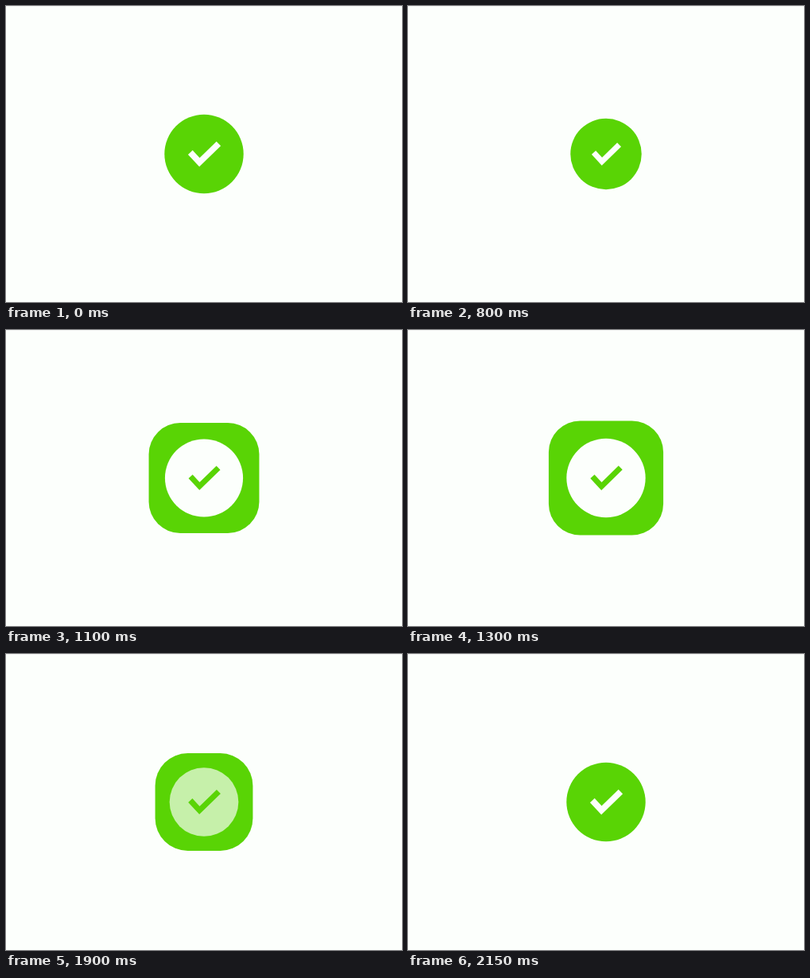
These frames come from a looping animation (498x373 px, 2.2 s). An HTML page:

```html
<!DOCTYPE html>
<html lang="en">
<head>
<meta charset="utf-8">
<title>Check toggle</title>
<style>
  html, body { margin: 0; width: 100%; height: 100%; overflow: hidden; background: #fcfffc; }
  svg { display: block; width: 498px; height: 373px; }
  .soft { filter: blur(.4px); }
</style>
</head>
<body>
<svg viewBox="0 0 498 373">
  <rect width="498" height="1" fill="#f3f5f3"/>
  <g class="soft" transform="translate(249 186.5)">
    <rect id="tile" fill="#59d405"/>
    <circle id="disc" fill="#fcfffc"/>
    <polyline id="check" points="-17.2,-2 -5.7,10.5 18.4,-13" fill="none"/>
  </g>
</svg>
<script>
// Times are in seconds.
const LOOP = 2.2, FPS = 20;
const PRESS = .45, RELEASE = .8, RESET = 1.85;
const GREEN = [89, 212, 5], WHITE = [252, 255, 252];
const [tile, disc, check] = ['tile', 'disc', 'check'].map(id => document.getElementById(id));

const clamp = x => Math.min(1, Math.max(0, x));
const ramp = (t, start, length) => clamp((t - start) / length);
const mix = (a, b, k) => a + (b - a) * k;

// Slow squeeze while pressed, then a damped bounce.
function bounce(t) {
  const s = t - RELEASE;
  if (s > 0) return 1 + .28 * Math.exp(-5 * s) * Math.sin(12.7 * (s - .029));
  const k = ramp(t, PRESS, RELEASE - PRESS);
  return 1 - .1 * (1 - Math.cos(Math.PI * k)) / 2;
}

function set(el, attrs) {
  for (const name in attrs) el.setAttribute(name, attrs[name]);
}

function draw() {
  const t = Math.floor(performance.now() / 1000 % LOOP * FPS) / FPS;
  const scale = bounce(t);
  const spread = 1 - Math.exp(-Math.max(0, t - RELEASE - .02) / .12);
  const open = spread * (1 - ramp(t, RESET, .1));
  const alpha = ramp(t, RELEASE, .12) * (1 - ramp(t, RESET, .15));
  const grow = Math.sin(alpha * Math.PI / 2);
  const tint = clamp(alpha * 3);
  const size = mix(99.4, 146, open) * scale;

  set(tile, {
    x: -size / 2, y: -size / 2, width: size, height: size,
    rx: Math.min(mix(50, 39.5, grow), size / 2)
  });
  set(disc, { r: 50 * grow * scale, opacity: alpha });
  set(check, {
    transform: `scale(${scale})`,
    stroke: `rgb(${WHITE.map((c, i) => Math.round(mix(c, GREEN[i], tint)))})`,
    'stroke-width': mix(7.8, 7.1, tint)
  });
  requestAnimationFrame(draw);
}
draw();
</script>
</body>
</html>
```
